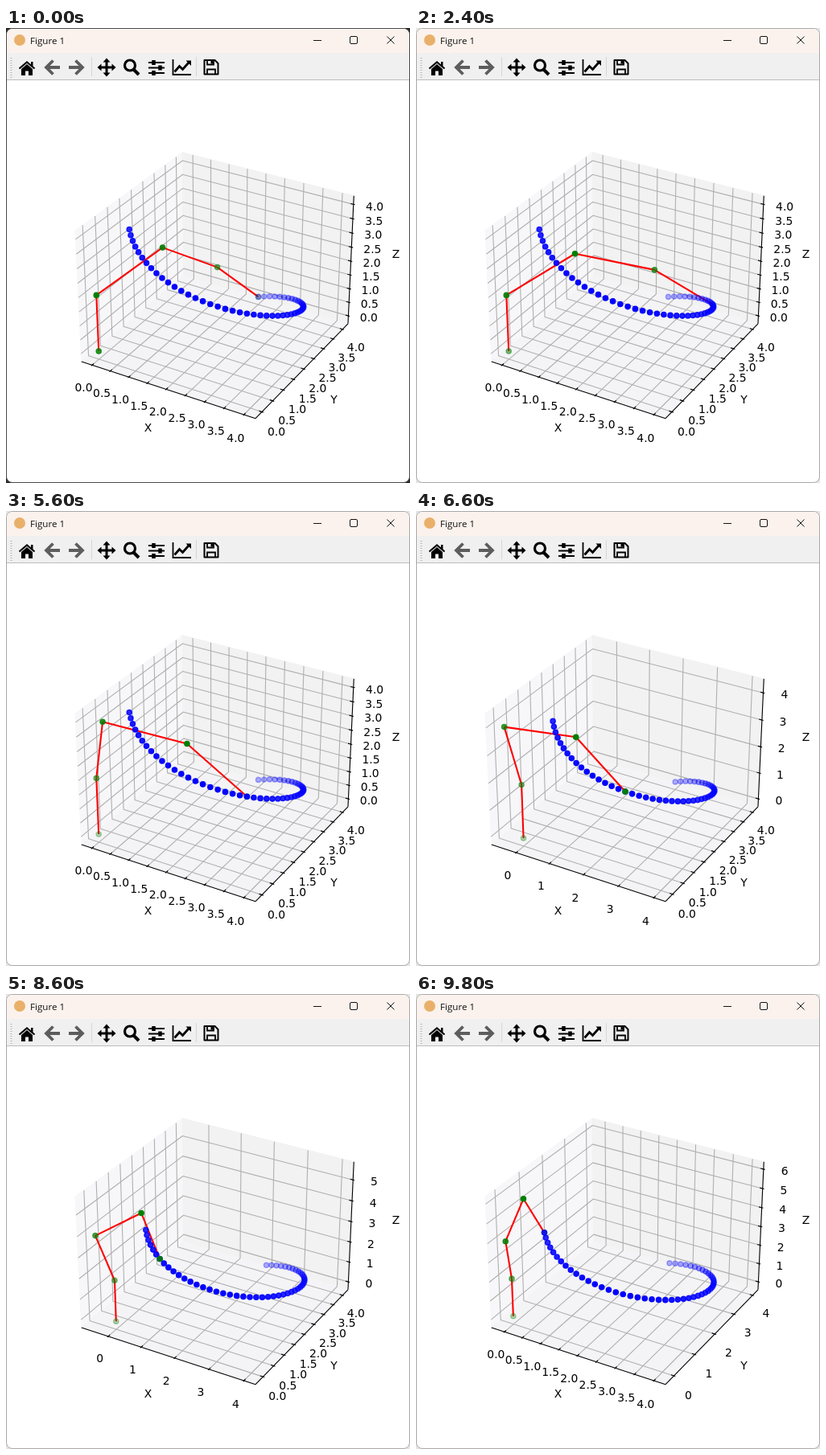
Write an HTML page with a canvas that moves like this. It is 502 by 566 pixels and loops after 10 s.

```html
<!DOCTYPE html>
<html lang="en">
<head>
<meta charset="utf-8">
<title>Figure 1</title>
<style>
  html, body { margin: 0; width: 100%; height: 100%; overflow: hidden; background: #e4e4e4; }
  body.inactive { background: #2b2b2b; }
  #window {
    position: absolute; left: 0; top: 0; width: 502px; height: 566px; box-sizing: border-box;
    border: 1px solid #a9a9a9; border-radius: 8px; overflow: hidden; background: #fff;
  }
  .inactive #window { border-color: #4a4a4a; }
  #chrome { position: absolute; left: -1px; top: -1px; }
  canvas { position: absolute; left: 0; top: 0; }
</style>
</head>
<body>
<div id="window">
  <svg id="chrome" width="502" height="66" fill="none">
    <rect width="502" height="31" fill="#fbf2ed"/>
    <rect y="31" width="502" height="34" fill="#f0f0f0"/>
    <path d="M0 64.5H502" stroke="#bdbdbd"/>
    <circle cx="17" cy="15" r="7" fill="#e9b06a"/>
    <text x="30" y="20" font-family="'Open Sans', sans-serif" font-size="11.6" fill="#111">Figure 1</text>
    <g stroke="#111" stroke-width="1">
      <path d="M382 15.5H392M473.5 10.5L482.5 19.5M482.5 10.5L473.5 19.5"/>
      <rect x="427.5" y="10.5" width="9" height="9" rx="1.5"/>
    </g>
    <path d="M6.5 37V62" stroke="#b4b4b4" stroke-width="2" stroke-dasharray="1 2"/>
    <path d="M106.5 36V60M236.5 36V60" stroke="#d6d6d6"/>
    <!-- home -->
    <path d="M16.5 50.5L26 42.5L35.5 50.5" stroke="#000" stroke-width="2.2"/>
    <path d="M31 42H33.5V48L31 46ZM19 51L26 45L33 51V59H28V53.5H24V59H19Z" fill="#000"/>
    <!-- back, forward -->
    <g stroke="#5d5d5d" stroke-width="3.8">
      <path d="M58.5 40.5L50 49L58.5 57.5M50 49H67"/>
      <path d="M86.5 40.5L95 49L86.5 57.5M95 49H78"/>
    </g>
    <!-- pan -->
    <path d="M125 41V57M117 49H133" stroke="#000" stroke-width="3"/>
    <path d="M125 37.5L129.5 42.5H120.5ZM125 60.5L129.5 55.5H120.5ZM113.5 49L118.5 44.5V53.5ZM136.5 49L131.5 44.5V53.5Z" fill="#000"/>
    <!-- zoom -->
    <circle cx="154" cy="46.5" r="6.5" stroke="#000" stroke-width="3.2"/>
    <path d="M158.5 51.5L165 58" stroke="#000" stroke-width="4"/>
    <!-- sliders -->
    <path d="M177 43H197M177 49.5H197M177 56H197" stroke="#000" stroke-width="1.8"/>
    <path d="M183.5 40V46M191.5 46.5V52.5M183.5 53V59" stroke="#000" stroke-width="4.5"/>
    <!-- chart -->
    <path d="M207.5 39V58H230" stroke="#000" stroke-width="1.8"/>
    <path d="M209.5 54.5L215.5 47.5L219.5 51.5L227 43" stroke="#000" stroke-width="2.8"/>
    <path d="M223.5 40.5H230V47Z" fill="#000"/>
    <!-- save -->
    <path d="M246.5 40H259.5L263.5 44V57.5H246.5Z" stroke="#000" stroke-width="2" stroke-linejoin="round"/>
    <path d="M250 57V51.5H260V57M250 40V45.5H258V40" stroke="#000" stroke-width="1.8"/>
    <path d="M254.5 40H257V44.5H254.5Z" fill="#000"/>
  </svg>
</div>
<canvas id="plot" width="502" height="566"></canvas>
<script>
const STEP_MS = 200, STEPS = 50, LINK = 2, RAD = Math.PI / 180;
const ctx = document.getElementById('plot').getContext('2d');

// Perspective camera: elevation 30, azimuth -60, distance 10
const SCALE = 385 / 0.185, CX = 262.45, CY = 312.3;
const RIGHT = [0.8660254, 0.5, 0], UP = [-0.25, 0.4330127, 0.8660254], TO_EYE = [0.4330127, -0.75, 0.5];
const BOX = [4, 4, 3].map(v => v * 1.829464 / Math.sqrt(41));
const EDGE = BOX.map(b => b * 25 / 48);
const dot = (a, b) => a[0] * b[0] + a[1] * b[1] + a[2] * b[2];
function project(p) {
  const k = SCALE / (10 - dot(TO_EYE, p));
  return [CX + dot(RIGHT, p) * k, CY - dot(UP, p) * k];
}

const path = Array.from({ length: STEPS }, (_, i) => {
  const t = 4 * i / (STEPS - 1);
  return [2 + 2 * Math.sin(t), 2 + 2 * Math.cos(t), t];
});

// Wrist bend in degrees at key steps, joined by a cubic
const bendKeys = [[0, 12], [12, 21.9], [20, 26.3], [33, 55.9], [39, 91.4], [43, 125.3], [49, 152.2]];
function keySlope(i) {
  const last = bendKeys.length - 1;
  const rate = j => (bendKeys[j + 1][1] - bendKeys[j][1]) / (bendKeys[j + 1][0] - bendKeys[j][0]);
  if (i === 0) return rate(0);
  if (i === last) return rate(last - 1);
  const before = bendKeys[i][0] - bendKeys[i - 1][0], after = bendKeys[i + 1][0] - bendKeys[i][0];
  return (rate(i - 1) * after + rate(i) * before) / (before + after);
}
function wristBend(step) {
  let i = 0;
  while (i < bendKeys.length - 2 && step >= bendKeys[i + 1][0]) i++;
  const [x0, y0] = bendKeys[i], [x1, y1] = bendKeys[i + 1];
  const h = x1 - x0, s = (step - x0) / h, r = 1 - s;
  return (r * r * (1 + 2 * s) * y0 + s * s * (3 - 2 * s) * y1
    + h * s * r * (r * keySlope(i) - s * keySlope(i + 1))) * RAD;
}

// Inverse kinematics in the vertical plane through the arm tip
function armJoints(step) {
  const [x, y, z] = path[step];
  const yaw = Math.atan2(y, x), reach = Math.hypot(x, y), height = z - LINK;
  const dist = Math.hypot(reach, height), bend = wristBend(step);
  const outer = 2 * LINK * Math.cos(bend / 2);
  const shoulder = Math.atan2(height, reach)
    + Math.acos((dist * dist + LINK * LINK - outer * outer) / (2 * LINK * dist));
  const place = (s, h) => [s * Math.cos(yaw), s * Math.sin(yaw), h];
  const s2 = LINK * Math.cos(shoulder), h2 = LINK + LINK * Math.sin(shoulder);
  const elbow = Math.atan2(z - h2, reach - s2) + bend / 2;
  return [[0, 0, 0], [0, 0, LINK], place(s2, h2),
    place(s2 + LINK * Math.cos(elbow), h2 + LINK * Math.sin(elbow)), [x, y, z]];
}

function polyline(points, color, width) {
  ctx.beginPath();
  points.forEach(p => ctx.lineTo(...project(p)));
  ctx.strokeStyle = color;
  ctx.lineWidth = width;
  ctx.stroke();
}

function pane(corners, color) {
  ctx.beginPath();
  corners.forEach(p => ctx.lineTo(...project(p)));
  ctx.closePath();
  ctx.fillStyle = ctx.strokeStyle = color;
  ctx.lineWidth = 1.2;
  ctx.fill();
  ctx.stroke();
}

function scatter(points, rgb) {
  const depth = p => -10 / (10 - dot(TO_EYE, p));
  const depths = points.map(depth), near = Math.min(...depths), far = Math.max(...depths);
  ctx.lineWidth = 1.39;
  [...points].sort((a, b) => depth(b) - depth(a)).forEach(p => {
    const alpha = 1 - 0.7 * (depth(p) - near) / (far - near);
    ctx.fillStyle = ctx.strokeStyle = `rgba(${rgb},${alpha})`;
    ctx.beginPath();
    ctx.arc(...project(p), 3.105, 0, 2 * Math.PI);
    ctx.fill();
    ctx.stroke();
  });
}

function ticks([low, high]) {
  const gap = (high - low) / 9 <= 0.5 ? 0.5 : 1, list = [];
  for (let v = Math.ceil(low / gap) * gap; v <= high; v += gap) {
    list.push({ v, text: (v < 0 ? '\u2212' : '') + Math.abs(v).toFixed(gap < 1 ? 1 : 0) });
  }
  return list;
}

function text(str, p, drop) {
  const [x, y] = project(p);
  ctx.fillText(str, x, y + drop);
}

function draw(step) {
  document.body.classList.toggle('inactive', step === 0);
  const joints = armJoints(step), all = [...path, ...joints];
  const limits = [0, 1, 2].map(a => {
    const values = all.map(p => p[a]), low = Math.min(...values), high = Math.max(...values);
    const margin = (high - low) * 0.05;
    return [low - margin, high + margin];
  });
  const toBox = (v, a) => BOX[a] * ((v - limits[a][0]) / (limits[a][1] - limits[a][0]) - 0.5);
  const inBox = p => p.map(toBox);
  const [X, Y, Z] = EDGE;

  ctx.clearRect(0, 0, 502, 566);
  ctx.lineJoin = 'round';
  pane([[-X, -Y, -Z], [-X, Y, -Z], [-X, Y, Z], [-X, -Y, Z]], '#f7f7f9');
  pane([[-X, Y, -Z], [X, Y, -Z], [X, Y, Z], [-X, Y, Z]], '#f2f2f2');
  pane([[-X, -Y, -Z], [X, -Y, -Z], [X, Y, -Z], [-X, Y, -Z]], '#f4f4f6');

  const axes = [
    { name: 'X', at: v => [v, -Y, -Z], out: [0, -1, -1], tick: [0, -1, 0], end: X,
      grid: v => [[v, -Y, -Z], [v, Y, -Z], [v, Y, Z]] },
    { name: 'Y', at: v => [X, v, -Z], out: [1, 0, -1], tick: [1, 0, 0], end: Y,
      grid: v => [[X, v, -Z], [-X, v, -Z], [-X, v, Z]] },
    { name: 'Z', at: v => [X, Y, v], out: [1, 1, 0], tick: [1, 0, 0], end: Z,
      grid: v => [[X, Y, v], [-X, Y, v], [-X, -Y, v]] }
  ];
  const shift = (p, dir, amount) => p.map((v, a) => v + dir[a] * amount * BOX[a] / 12);
  const marks = limits.map(ticks);
  axes.forEach((axis, a) => marks[a].forEach(m => polyline(axis.grid(toBox(m.v, a)), '#b0b0b0', 1.11)));

  ctx.font = "13.89px 'DejaVu Sans', sans-serif";
  ctx.textAlign = 'center';
  axes.forEach((axis, a) => {
    polyline([axis.at(-axis.end), axis.at(axis.end)], '#000', 1.11);
    ctx.fillStyle = '#000';
    text(axis.name, shift(axis.at(0), axis.out, 2.1645), 3.6);
    marks[a].forEach(m => {
      const p = axis.at(toBox(m.v, a));
      polyline([shift(p, axis.tick, 0.1), shift(p, axis.tick, -0.2)], '#000', 1.11);
      text(m.text, shift(p, axis.out, 0.9957), 10.6);
    });
  });

  const arm = joints.map(inBox), trail = path.map(inBox);
  polyline(arm, '#f00', 2.08);
  const nearest = points => Math.max(...points.map(p => dot(TO_EYE, p)));
  [[trail, '0,0,255'], [arm, '0,128,0']]
    .sort((a, b) => nearest(a[0]) - nearest(b[0]))
    .forEach(([points, rgb]) => scatter(points, rgb));
}

const start = performance.now();
let shown = -1;
function play() {
  const step = Math.floor((performance.now() - start) / STEP_MS) % STEPS;
  if (step !== shown) draw(shown = step);
  requestAnimationFrame(play);
}
play();
</script>
</body>
</html>
```
